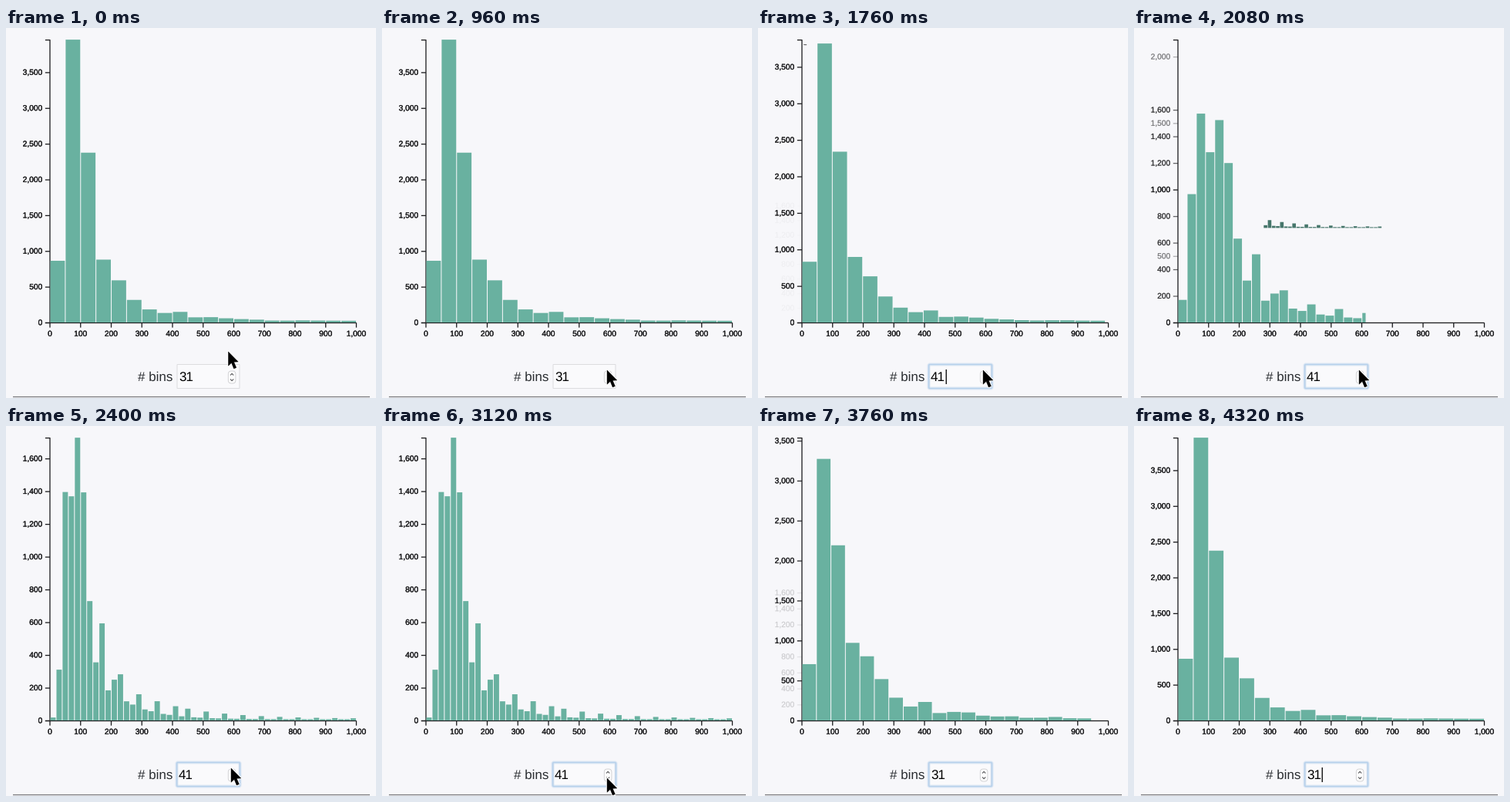
A matplotlib script that plays this animation: 480 by 480 pixels, repeating every 4.4 s.

```python
import matplotlib.pyplot as plt
import numpy as np
from matplotlib.animation import FuncAnimation
from matplotlib.patches import FancyBboxPatch, Polygon, Rectangle
from matplotlib.patheffects import withStroke

SIZE, DPI = 480, 100
FRAMES, STEP = 55, 80                 # 55 * 80 ms = 4400 ms
UP, DOWN, DURATION = 1632, 3190, 796  # clicks on the stepper, transition time
BLINK = 400

S = 1.0192                            # page zoom
LEFT, TOP, WIDTH, HEIGHT = 56.5, 15.1, 390 * S, 360 * S
BOTTOM = TOP + HEIGHT
BG, INK = "#f7f7fa", "#1c1c1e"
GREEN = np.array([0x69, 0xB1, 0xA0]) / 255

# Samples up to each value near the peak; the tail follows a rule
HEAD = [(20, 18), (40, 310), (50, 535), (60, 860), (80, 1369), (100, 1727),
        (120, 1393), (140, 729), (150, 253), (160, 102), (180, 593),
        (200, 184), (220, 249), (240, 282)]

# time, x, y of the pointer tip
PATH = np.array([[0, 288.4, 420], [520, 292, 444], [2440, 292, 444],
                 [2720, 292, 457], [3520, 292, 457], [3800, 292, 486]])
ARROW = np.array([[0, 0], [0, 18.2], [4.1, 14.4], [7.2, 22], [10.4, 20.6],
                  [7.2, 13.2], [12.8, 13]])

plt.rcParams["font.family"] = "Liberation Sans"
plt.rcParams["text.hinting"] = "no_hinting"


def cumulative():
    """Edges and running sample counts over 0..1000."""
    i = np.arange(12, 50)
    spikes = np.isin(i, [*range(14, 21, 3), *range(22, 50, 3)])
    tail = np.where(spikes, 10 + 150 * np.exp((14 - i) / 9),
                    7 + 110 * np.exp((12 - i) / 5))
    ends, counts = np.transpose(HEAD)
    return (np.concatenate([[0], ends, 20 * (i + 1)]),
            np.cumsum(np.concatenate([[0], counts, tail])))


class Histogram:
    """Bin boxes (x, y, w, h) and the y ticks of one binning."""

    def __init__(self, bin_size, tick_step):
        edges = np.arange(0, 1001, bin_size)
        counts = np.diff(np.interp(edges, *cumulative()))
        self.unit = HEIGHT / counts.max()
        self.ticks = set(range(0, int(counts.max()), tick_step))
        h = np.append(counts, 0) * self.unit
        w = np.append(np.diff(edges) * WIDTH / 1000, 0) - S  # last bin is empty
        self.boxes = np.column_stack(
            [edges * WIDTH / 1000 + S, HEIGHT - h, w, h])


coarse, fine = Histogram(50, 500), Histogram(20, 200)

fig = plt.figure(figsize=(SIZE / DPI, SIZE / DPI), dpi=DPI, facecolor=BG)
ax = fig.add_axes([0, 0, 1, 1])
ax.set(xlim=(0, SIZE), ylim=(SIZE, 0))
ax.axis("off")


def pt(px):
    return px * 72 / DPI


def line(xs, ys, color=INK, width=1.3, **kw):
    return ax.plot(xs, ys, color=color, lw=pt(width), snap=False,
                   solid_capstyle="butt", **kw)[0]


def label(x, y, text, px, ha="left", color=INK, **kw):
    return ax.text(x, y, text, fontsize=pt(px), ha=ha, va="baseline",
                   color=color, **kw)


def axis_label(x, y, value, ha):
    bolder = [withStroke(linewidth=pt(0.3), foreground=INK)]
    return label(x, y, f"{value:,}", 10.2, ha, path_effects=bolder)


def round_box(x, y, w, h, r, **kw):
    style = f"round,pad=0,rounding_size={r}"
    return ax.add_patch(FancyBboxPatch((x, y), w, h, boxstyle=style, **kw))


# Axes
x_axis, y_axis, tick = LEFT + 0.5, BOTTOM + 0.5, 6 * S
line([x_axis - tick, x_axis, x_axis, x_axis - tick],
     [TOP + 0.5, TOP + 0.5, y_axis, y_axis], zorder=1)
line([x_axis, x_axis + WIDTH], [y_axis, y_axis], zorder=1)
for v in range(0, 1001, 100):
    x = x_axis + WIDTH * v / 1000
    line([x, x], [y_axis, y_axis + tick], zorder=1)
    axis_label(x, 399.8, v, "center")

clip = Rectangle((0, TOP - 10 * S), SIZE, SIZE, transform=ax.transData)
y_ticks = {}
for v in coarse.ticks | fine.ticks:
    mark = line([x_axis - tick, x_axis], [0, 0], zorder=1)
    name = axis_label(LEFT - 9 * S, 0, v, "right")
    mark.set_clip_path(clip)
    name.set_clip_path(clip)
    y_ticks[v] = mark, name

bars = [ax.add_patch(Rectangle((0, 0), 0, 0, lw=0, snap=False, zorder=2))
        for _ in fine.boxes]

# Number field
label(171, 458, "# bins", 17, color="#2a2d31")
round_box(222, 436.5, 81, 31, 0.5, fc="#fafafc", ec="#dcdcdf", lw=pt(1),
          zorder=2)
glow = [round_box(221.5, 436.5, 82, 31, 1.5, fc="none", ec="#b4d0ec",
                  lw=pt(w), alpha=a, zorder=2.1)
        for w, a in [(4, 0.4), (1.5, 0.9)]]
value = label(224, 458.5, "31", 17, color="black", zorder=3)
caret = line([244.2, 244.2], [443, 462], "black", zorder=3)
round_box(288.3, 445, 9.6, 16, 4, fc="#fdfdfd", ec="#d0d0d3", lw=pt(0.9),
          zorder=3)
for y, d in [(450.5, -2.2), (455.5, 2.2)]:
    line([291, 293.1, 295.2], [y, y + d, y], "#555558", 1.1, zorder=3)

line([9, 472], [478.5, 478.5], "#77777a", 1.2)
halo, pointer = [
    ax.add_patch(Polygon(ARROW, closed=True, fc="black", ec=color, lw=pt(w),
                         joinstyle="round", zorder=5))
    for color, w in [("white", 2.4), ("black", 0.4)]]


def cubic(p):
    p = min(max(p, 0), 1)
    return 4 * p ** 3 if p < 0.5 else 1 - 4 * (1 - p) ** 3


def pointer_at(t):
    i = min(np.searchsorted(PATH[:, 0], t, side="right") - 1, len(PATH) - 2)
    a, b = PATH[i], PATH[i + 1]
    p = min((t - a[0]) / (b[0] - a[0]), 1)
    return a[1:] + (b - a)[1:] * p * p * (3 - 2 * p)


def draw_ticks(old, new, e):
    unit = old.unit + (new.unit - old.unit) * e
    for v, (mark, name) in y_ticks.items():
        alpha = (v in old.ticks) * (1 - e) + (v in new.ticks) * e
        y = BOTTOM - v * unit
        mark.set_ydata([y + 0.5, y + 0.5])
        name.set_y(y + 3.4)
        for part in (mark, name):
            part.set_alpha(alpha)
            part.set_visible(alpha > 0.004 and y > -10)


def draw_bars(old, new, e):
    for i, bar in enumerate(bars):
        if i >= len(new.boxes):       # surplus bars vanish at once
            bar.set_visible(False)
            continue
        fresh = i >= len(old.boxes)   # new bars grow black from the corner
        start = np.zeros(4) if fresh else old.boxes[i]
        x, y, w, h = start + (new.boxes[i] - start) * e
        bar.set_bounds(LEFT + x, TOP + y, max(w, 0), max(h, 1))
        bar.set_facecolor(GREEN * e if fresh else GREEN)
        bar.set_visible(w > 0)


def draw(i):
    t = i * STEP
    if t < UP:
        old, new, click = coarse, coarse, 0
    elif t < DOWN:
        old, new, click = coarse, fine, UP
    else:
        old, new, click = fine, coarse, DOWN
    e = cubic((t - click) / DURATION)
    draw_ticks(old, new, e)
    draw_bars(old, new, e)

    focused = t >= UP
    value.set_text("41" if new is fine else "31")
    caret.set_visible(focused and (t - click) // BLINK % 2 == 0)
    for ring in glow:
        ring.set_visible(focused)
    for part in (halo, pointer):
        part.set_xy(ARROW + pointer_at(t))
    return []


anim = FuncAnimation(fig, draw, frames=FRAMES, interval=STEP, repeat=True,
                     repeat_delay=0, blit=False)
plt.show()
```
